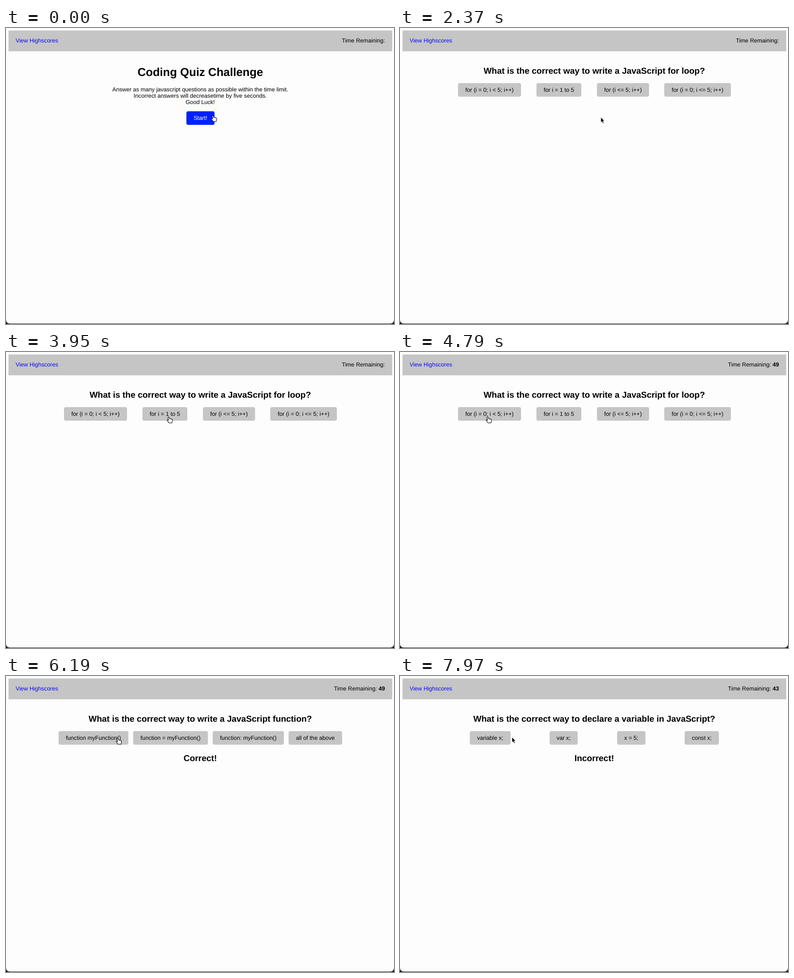
These frames come from a looping animation (856 by 654 pixels, 7990 ms). An HTML page:

```html
<!DOCTYPE html>
<html lang="en">
<head>
<meta charset="utf-8">
<title>Coding Quiz Challenge</title>
<style>
  html, body { margin: 0; width: 100%; height: 100%; overflow: hidden; background: #1c1a1a; }
  svg { display: block; width: 856px; height: 654px; }
  text {
    font: 12.64px "Liberation Sans", Arial, sans-serif;
    text-rendering: geometricPrecision;
  }
  .mid { text-anchor: middle; }
  .end { text-anchor: end; }
  .h1 { font-size: 25.3px; font-weight: bold; }
  .h2 { font-size: 18.95px; font-weight: bold; }
  .bold { font-weight: bold; }
</style>
</head>
<body>
<svg viewBox="0 0 856 654">
  <path d="M0 0H856V644Q856 653 847 653H9Q0 653 0 644Z" fill="#fdfdfd"/>
  <rect x="5.5" y="5.5" width="846.5" height="46" fill="#c5c5c5"/>
  <text x="21.3" y="32.4" fill="#0c0cee">View Highscores</text>
  <text id="timer" class="end" x="836" y="32.4">Time Remaining:<tspan id="count" class="bold"></tspan></text>
  <g id="screens"></g>
  <g id="cursor">
    <path id="arrow" d="M0 0V12L2.7 9.6L4.7 14L6.7 13.1L4.8 8.8H8.4Z" fill="#000" stroke="#fff" stroke-width=".9"/>
    <path id="hand" d="M-2.2 .6C-2-.9 0-.9 .5 .5L1.4 3.7C2.1 2.9 3.2 3.1 3.6 4.1C4.5 3.4 5.6 3.8 5.9 4.9C7.2 4.5 7.9 5.3 7.9 6.6C7.9 9 6.9 10 6.7 12.7H0C-.5 11-2.6 9.3-3.9 7.2C-4.5 6-3.2 5.1-2 6.1L-.8 7.1Z"
      fill="#fff" stroke="#000" stroke-width="1.1" stroke-linejoin="round"/>
  </g>
</svg>
<script>
const LOOP = 7990;
const $ = id => document.getElementById(id);

// Buttons: [left, right, label]
const screens = [
  { from: 0, top: 184, fill: '#0021ff', ink: '#fff',
    lines: [['Coding Quiz Challenge', 106.3, 'h1'],
      ['Answer as many javascript questions as possible within the time limit.', 139.5],
      ['Incorrect answers will decreasetime by five seconds.', 153.8],
      ['Good Luck!', 168]],
    buttons: [[398, 460, 'Start!']] },
  { from: 2240,
    lines: [['What is the correct way to write a JavaScript for loop?', 100.7, 'h2']],
    buttons: [[128, 267, 'for (i = 0; i < 5; i++)'], [301, 400, 'for i = 1 to 5'],
      [434.5, 549.5, 'for (i <= 5; i++)'], [583, 730, 'for (i = 0; i <= 5; i++)']] },
  { from: 5250,
    lines: [['What is the correct way to write a JavaScript function?', 100.7, 'h2'],
      ['Correct!', 188, 'h2']],
    buttons: [[116, 270, 'function myFunction()'], [280.5, 445.5, 'function = myFunction()'],
      [456, 613, 'function: myFunction()'], [623.5, 741.5, 'all of the above']] },
  { from: 7550,
    lines: [['What is the correct way to declare a variable in JavaScript?', 100.7, 'h2'],
      ['Incorrect!', 188, 'h2']],
    buttons: [[154, 244, 'variable x;'], [330, 392, 'var x;'],
      [479, 541.5, 'x = 5;'], [628, 703.5, 'const x;']] }
];

const counts = [[0, ''], [4750, 49], [7270, 48], [7550, 43]];

// Pointer tip: [time, x, y]
const path = [
  [0, 457, 194], [420, 448, 197], [900, 443, 199], [2130, 443, 199], [2240, 443, 197],
  [2500, 443, 197], [3070, 457, 163], [3250, 479, 145], [3500, 481, 144],
  [4500, 196, 144], [4790, 194, 144], [5350, 194, 144], [6000, 247, 138],
  [7300, 247, 138], [7700, 247, 135], [LOOP, 247, 135]
];

function add(parent, tag, attrs, content = '') {
  const node = document.createElementNS('http://www.w3.org/2000/svg', tag);
  for (const key in attrs) node.setAttribute(key, attrs[key]);
  node.textContent = content;
  return parent.appendChild(node);
}

for (const screen of screens) {
  const { top = 121.7, fill = '#c5c5c5', ink = '#000' } = screen;
  screen.top = top;
  screen.node = add($('screens'), 'g', {});
  for (const [label, y, style = ''] of screen.lines)
    add(screen.node, 'text', { x: 428.6, y, class: 'mid ' + style }, label);
  for (const [left, right, label] of screen.buttons) {
    add(screen.node, 'rect', { x: left, y: top, width: right - left, height: 30, rx: 4, fill });
    add(screen.node, 'text', { x: (left + right) / 2, y: top + 18.9, class: 'mid', fill: ink }, label);
  }
}

function pointerAt(time) {
  const i = path.findIndex(step => step[0] > time);
  const [t0, x0, y0] = path[i - 1], [t1, x1, y1] = path[i];
  const p = (time - t0) / (t1 - t0);
  const k = p * p * (3 - 2 * p);
  return [x0 + (x1 - x0) * k, y0 + (y1 - y0) * k];
}

function draw(now) {
  const time = now % LOOP;
  const current = screens.findLast(screen => screen.from <= time);
  for (const screen of screens)
    screen.node.style.display = screen === current ? '' : 'none';

  const count = counts.findLast(step => step[0] <= time)[1];
  $('count').textContent = count && '\u00a0' + count;

  const [x, y] = pointerAt(time);
  const over = y >= current.top && y <= current.top + 30 &&
    current.buttons.some(([left, right]) => x >= left && x <= right);
  $('cursor').setAttribute('transform', `translate(${x} ${y})`);
  $('hand').style.display = over ? '' : 'none';
  $('arrow').style.display = over ? 'none' : '';
}

const start = performance.now();
function tick() {
  draw(performance.now() - start);
  requestAnimationFrame(tick);
}
tick();
</script>
</body>
</html>
```
